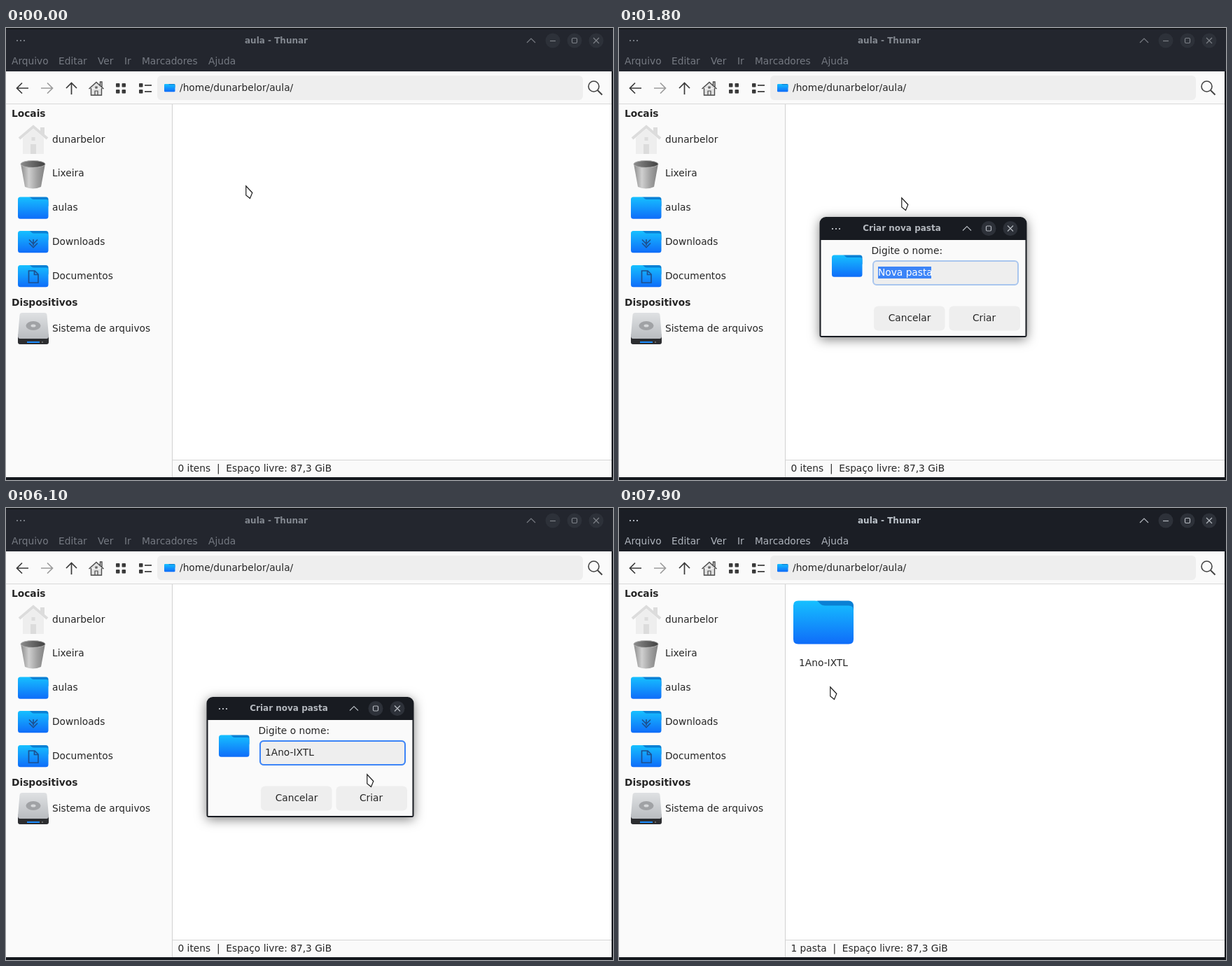
An HTML page with a canvas for the animation above (8000 ms loop, 867 by 646 pixels).

```html
<!DOCTYPE html>
<html lang="pt-BR">
<head>
<meta charset="utf-8">
<title>aula</title>
<style>
html, body { margin: 0; width: 100%; height: 100%; overflow: hidden; background: #15181d; }
canvas { display: block; width: 867px; height: 646px; }
</style>
</head>
<body>
<canvas id="stage" width="867" height="646"></canvas>
<script>
const ctx = document.getElementById('stage').getContext('2d');
const FACE = '"DejaVu Sans", sans-serif';
const BODY = '13.75px ' + FACE, BOLD = 'bold 13.75px ' + FACE, TITLE = 'bold 12px ' + FACE;
const INK = '#262626', ACCENT = '#3c84f7';
const LOOP = 8000, USER = 'dunarbelor', FOLDER = '1Ano-IXTL';

// time and pointer position, linear in between
const POINTER = [
  [0, 342, 225], [900, 342, 225], [1000, 350, 232], [1200, 403, 242], [5600, 403, 242],
  [5700, 412, 252], [5900, 472, 327], [6100, 515, 380], [6300, 527, 404], [6500, 532, 414],
  [6900, 532, 414], [7200, 470, 326], [7500, 410, 266], [7600, 410, 266], [7900, 301, 255]
];
// when each character of the folder name is typed
const KEYS = [2700, 3200, 3500, 3600, 3900, 4300, 4500, 4600, 4800];

function text(s, x, y, color = INK, font = BODY, align = 'left') {
  ctx.font = font;
  ctx.textAlign = align;
  ctx.fillStyle = color;
  ctx.fillText(s, x, y);
}
function rect(x, y, w, h, color) {
  ctx.fillStyle = color;
  ctx.fillRect(x, y, w, h);
}
function round(x, y, w, h, r, fill, stroke, lw = 1) {
  ctx.beginPath();
  ctx.roundRect(x, y, w, h, r);
  paint(fill, stroke, lw);
}
function ellipse(x, y, rx, ry, fill, stroke, lw = 1) {
  ctx.beginPath();
  ctx.ellipse(x, y, rx, ry, 0, 0, Math.PI * 2);
  paint(fill, stroke, lw);
}
function path(d, fill, stroke, lw = 1) {
  const p = new Path2D(d);
  if (fill) { ctx.fillStyle = fill; ctx.fill(p); }
  if (stroke) { ctx.strokeStyle = stroke; ctx.lineWidth = lw; ctx.stroke(p); }
}
function paint(fill, stroke, lw) {
  if (fill) { ctx.fillStyle = fill; ctx.fill(); }
  if (stroke) { ctx.strokeStyle = stroke; ctx.lineWidth = lw; ctx.stroke(); }
}
function fade(x0, y0, x1, y1, ...colors) {
  const g = ctx.createLinearGradient(x0, y0, x1, y1);
  colors.forEach((c, i) => g.addColorStop(i / (colors.length - 1), c));
  return g;
}
function shadow(blur, dy, alpha) {
  ctx.shadowColor = `rgba(0,0,0,${alpha})`;
  ctx.shadowBlur = blur;
  ctx.shadowOffsetY = dy;
}
function at(x, y, scale, draw) {
  ctx.save();
  ctx.translate(x, y);
  ctx.scale(scale, scale);
  draw();
  ctx.restore();
}

function folder(x, y, w, selected) {
  const [back, top, low] = selected ? ['#0343c6', '#0562fb', '#033df0'] : ['#0a80d4', '#16c0ff', '#0f6cf9'];
  at(x, y, w / 86, () => {
    round(28, 0, 58, 30, 7, back);
    path('M0 7Q0 0 7 0H31Q35 0 37 3L39 5Q41 7 45 7H79Q86 7 86 14V55Q86 62 79 62H7Q0 62 0 55Z',
      fade(0, 0, 0, 62, top, low));
  });
}

function house(x, y, s, body, dark) {
  at(x, y, s, () => {
    path('M31 4H37V14H31Z', dark);
    path('M6 19L21 6L36 19V42H6Z', body);
    path('M1 20L21 3L41 20', null, dark, 4);
    path('M17 28H25V42H17ZM18.5 18H23.5V23H18.5Z', dark);
  });
}

function titleButtons(chevron, y, min, max, close, alpha) {
  const c = '#d3d8de';
  for (const x of [min, max, close]) if (x) ellipse(x, y, 10.5, 10.5, '#2d3139');
  ctx.globalAlpha = alpha;
  path(`M${chevron - 6} ${y + 3}l6 -6l6 6`, null, c, 1.2);
  if (min) path(`M${min - 4} ${y + .5}h8`, null, c, 1.2);
  round(max - 3.5, y - 3.5, 7, 7, 1.5, null, c, 1.2);
  path(`M${close - 4} ${y - 4}l8 8m0 -8l-8 8`, null, c, 1.2);
  ctx.globalAlpha = 1;
}
function dots(x, y, color) {
  for (let i = 0; i < 3; i++) rect(x + i * 5, y, 2, 2, color);
}

function header(focus) {
  rect(0, 0, 867, 62, '#23262e');
  ctx.globalAlpha = focus;
  rect(0, 0, 867, 62, '#1b1e25');
  ctx.globalAlpha = 1;
  rect(0, 0, 867, 2, '#16181c');
  const alpha = .48 + .34 * focus, c = '#cfd6de';
  titleButtons(750, 18, 781, 812, 843, alpha);
  ctx.globalAlpha = alpha;
  dots(15, 17, c);
  ctx.globalAlpha = alpha + .08;
  text('aula - Thunar', 386, 22, c, TITLE, 'center');
  ctx.globalAlpha = alpha;
  [['Arquivo', 8], ['Editar', 75], ['Ver', 131], ['Ir', 169], ['Marcadores', 194], ['Ajuda', 289]]
    .forEach(([s, x]) => text(s, x, 52, c));
  ctx.globalAlpha = 1;
}

function toolbar() {
  const c = '#3a3a3a';
  rect(0, 62, 865, 46, '#fafafa');
  rect(0, 108, 865, 1, '#d9d9d9');
  path('M32 86H16M23 78.5L15.5 86L23 93.5', null, c, 1.7);
  path('M50 86H66M59 78.5L66.5 86L59 93.5', null, '#9c9c9c', 1.7);
  path('M93.5 95V79M86 86L93.5 78.5L101 86', null, c, 1.7);
  path('M121.5 86V96H136.5V86M118.5 87L129 77.5L139.5 87M134.5 82V77H137V84', '#e2e2e2', '#4a4a4a', 1.4);
  path('M127 96V90H131V96M128 84H130V86H128Z', null, '#4a4a4a', 1.2);
  for (const y of [79, 88]) {
    for (const x of [157, 165.5]) round(x, y, 5.5, 5.5, 1, c);
    round(190, y, 5.5, 5.5, 1, c);
    rect(198, y + 2, 10, 1.7, c);
  }
  round(216, 68, 608, 35, 6, '#eeeeee');
  folder(226, 80, 15.5);
  text(`/home/${USER}/aula/`, 248, 90);
  ellipse(839.5, 83.5, 7.5, 7.5, null, '#444', 1.6);
  path('M845 89L851.5 95.5', null, '#444', 1.9);
}

function trash() {
  path('M21 194L27 227Q38.5 232 50 227L56 194Z', fade(21, 0, 56, 0, '#8b8b8b', '#cfcfcf', '#a2a2a2', '#808080'));
  ellipse(38.5, 194.5, 17.5, 5, fade(21, 0, 56, 0, '#8c8c8c', '#404040'), '#b5b5b5', 1);
}

function drive() {
  round(17, 437, 44, 15, 3, '#2c2d30');
  path('M23 407H55Q58 407 58.5 410L61 440Q61 444 58 444H20Q17 444 17 440L19.5 410Q20 407 23 407Z',
    fade(0, 407, 0, 444, '#dfe1e3', '#b9bcc0'));
  ellipse(39, 425.5, 10.5, 6.5, '#a0a2a5');
  ellipse(39, 425.5, 3.5, 2, '#d6d8da');
  rect(30, 448, 18, 2, '#1a8cff');
  rect(51, 448, 2, 2, '#666');
}

function sidebar() {
  rect(0, 109, 237, 533, '#fafafa');
  rect(237, 109, 1, 533, '#d2d2d2');
  text('Locais', 8, 127, INK, BOLD);
  text('Dispositivos', 8, 397, INK, BOLD);
  house(18, 138, 1, '#eeeeee', '#dcdcdc');
  trash();
  for (const y of [241.5, 290, 339]) folder(17, y, 43.5);
  const mark = '#1d4f8f';
  path('M39 302V311M33 302.5L39 308.5L45 302.5M33 307.5L39 313.5L45 307.5', null, mark, 1.6);
  path('M32.5 347H41L46 352V364H32.5ZM40.5 347V352.5H46', null, mark, 1.7);
  drive();
  [[USER, 164], ['Lixeira', 212], ['aulas', 261], ['Downloads', 310], ['Documentos', 359], ['Sistema de arquivos', 434]]
    .forEach(([s, y]) => text(s, 66, y));
}

function content(t) {
  rect(238, 109, 627, 508, '#fff');
  rect(238, 617, 627, 25, '#fafafa');
  rect(238, 617, 627, 1, '#d6d6d6');
  const free = '  |  Espaço livre: 87,3 GiB';
  let status = '0 itens' + free;
  if (t >= 1100 && t < 1800) status = 'Criar uma pasta vazia dentro da pasta atual';
  if (t >= 6800) {
    const selected = t < 7500;
    if (selected) round(245, 116, 95, 116, 6, ACCENT);
    folder(249, 132.5, 86, selected);
    text(FOLDER, 292, 226, selected ? '#fff' : INK, BODY, 'center');
    status = selected ? `"${FOLDER}"  |  Pasta` : '1 pasta' + free;
  }
  text(status, 245.5, 634);
}

function menuIcons() {
  const pale = '#d8d8d8';
  path('M361.5 241.5H366L368 243.5H375.5V252.5H361.5ZM368.5 245V251M365.5 248H371.5', null, pale);
  path('M363.5 268.5H370L373.5 272V282.5H363.5ZM368.5 272.5V279.5M365 276H372', null, pale);
  path('M363.5 306.5H373.5V317.5H363.5ZM366 305.5H371V308H366Z', null, '#e0e0e0');
  round(361, 341, 14, 13, 2, fade(0, 341, 0, 354, '#555', '#26282b'));
  path('M363 344l2 1.5l-2 1.5M366.5 347.5h3', null, '#bbb', .8);
  path('M362.5 420H373.5M368 414.5V425.5M362.5 449H373.5', null, '#222', 2);
  round(362, 472, 12, 12, 2, null, '#222', 1.3);
  path('M366.5 476.5L368.5 475V481', null, '#222', 1.6);
  for (let y = 508; y < 522; y += 4) rect(361, y, 14, 1, pale);
}

function menu(t, alpha) {
  ctx.save();
  ctx.globalAlpha = alpha;
  shadow(10, 2, .33);
  round(343, 226, 212, 309, 11, '#fff');
  shadow(0, 0, 0);
  if (t >= 1100) round(349, 231, 200, 29, 6, '#e9e9e9');
  for (const y of [293, 329, 365, 401, 496]) rect(349, y, 200, 1, '#d4d4d4');
  [['Criar pasta...', 250], ['Criar documento', 280], ['Colar', 316], ['Abrir terminal aqui', 352],
    ['Organizar itens', 388], ['Ampliar', 424], ['Diminuir', 453], ['Tamanho normal', 482], ['Propriedades...', 518]]
    .forEach(([s, y]) => text(s, 380.5, y, s === 'Colar' ? '#979797' : INK));
  for (const y of [275.5, 383.5]) path(`M534 ${y - 4.5}L539 ${y}L534 ${y + 4.5}Z`, '#222');
  menuIcons();
  ctx.restore();
}

function entry(t) {
  const strong = Math.min(1, (t - 1800) / 300);
  round(363, 333, 207, 34, 5, '#eeeeee', '#a9c6ee', 2);
  ctx.globalAlpha = strong;
  round(363, 333, 207, 34, 5, null, ACCENT, 2);
  ctx.globalAlpha = 1;
  if (t < KEYS[0]) {
    rect(370, 341, 76, 17, ACCENT);
    text('Nova pasta', 370, 354, '#fff');
    return;
  }
  const typed = FOLDER.slice(0, KEYS.filter(k => k <= t).length);
  text(typed, 370, 354);
  if (typed.length < FOLDER.length) rect(Math.round(370 + ctx.measureText(typed).width), 341, 1, 17, '#111');
}

function dialog(t) {
  shadow(16, 3, .5);
  round(286.5, 270, 296, 172, [9, 9, 3, 3], '#181b21');
  shadow(0, 0, 0);
  rect(288.5, 303, 292, 137, '#fafafa');
  dots(304, 286, '#b4b8be');
  titleButtons(497, 286.5, 0, 528, 559, .82);
  text('Criar nova pasta', 404, 290, '#b4b8be', TITLE, 'center');
  folder(304, 324.5, 43.5);
  text('Digite o nome:', 360.5, 323);
  entry(t);
  round(364, 397.5, 101.5, 35, 6, '#eeeeee');
  round(471.5, 397.5, 101.5, 35, 6, '#eeeeee');
  text('Cancelar', 415, 419, INK, BODY, 'center');
  text('Criar', 521.5, 419, INK, BODY, 'center');
}

function pointer(t) {
  let i = 0;
  while (i < POINTER.length - 2 && POINTER[i + 1][0] <= t) i++;
  const [t0, x0, y0] = POINTER[i], [t1, x1, y1] = POINTER[i + 1];
  const k = (t - t0) / (t1 - t0);
  at(Math.round(x0 + (x1 - x0) * k), Math.round(y0 + (y1 - y0) * k), 1, () =>
    path('M.8 .8V14L6.5 18.5L9.8 10.5Z', '#fff', '#1c1c1c', 1.2));
}

function render(t) {
  const opening = t < 300 ? 0 : t < 400 ? .5 : t < 500 ? .9 : 1;
  const focus = t < 1800 ? opening : t < 6700 ? 0 : t < 6800 ? .6 : 1;
  rect(0, 0, 867, 646, '#15181d');
  header(focus);
  toolbar();
  sidebar();
  content(t);
  if (opening && t < 1800) menu(t, opening);
  if (t >= 1800 && t < 6700) dialog(t);
  pointer(t);
}

function tick() {
  render(Math.floor(performance.now() % LOOP / 100) * 100);
  requestAnimationFrame(tick);
}
tick();
</script>
</body>
</html>
```
